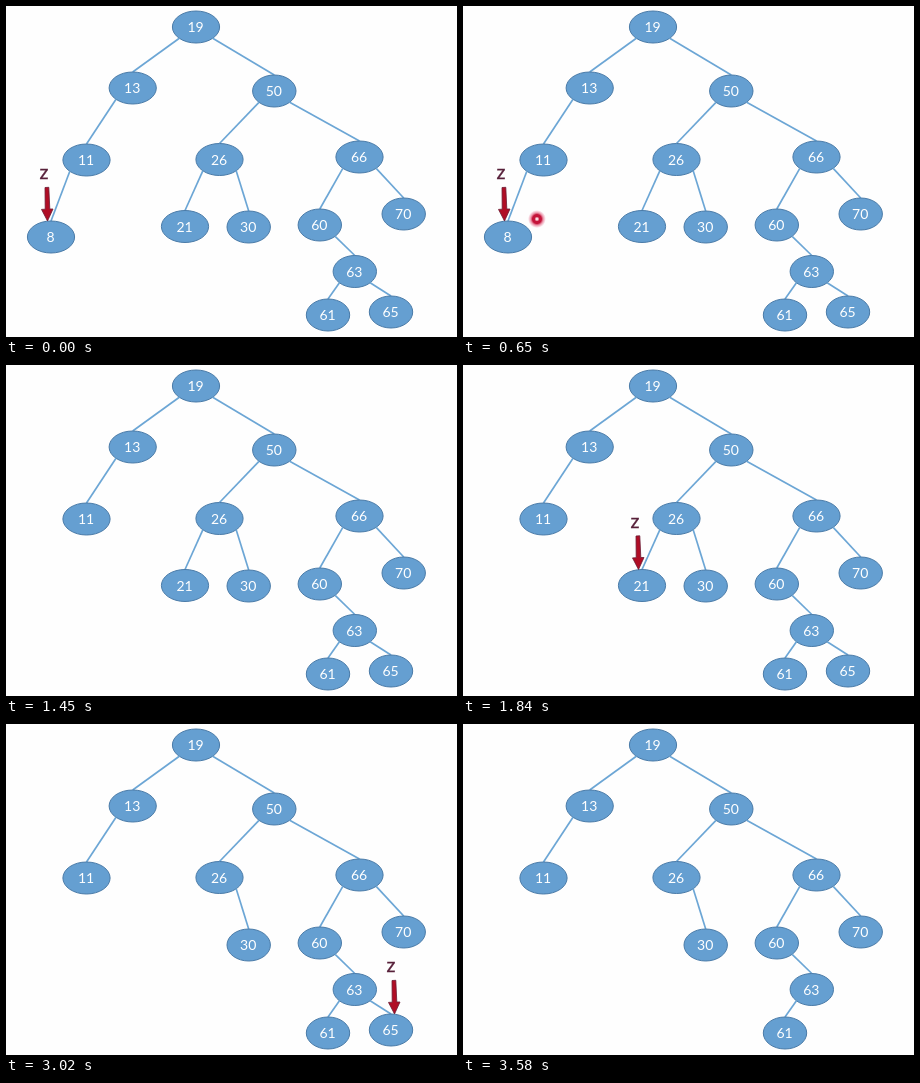
These frames come from a looping animation (451 px wide and 331 px high, 3.63 s). An HTML page:

```html
<!DOCTYPE html>
<html lang="en">
<head>
<meta charset="utf-8">
<title>Binary tree deletion</title>
<style>
  html, body { margin: 0; width: 100%; height: 100%; overflow: hidden; background: #fefefe; }
  svg { display: block; width: 451px; height: 331px; }
  text { font: 14px Lato, "Open Sans", sans-serif; text-anchor: middle; }
  .edge { stroke: #6ca6d5; stroke-width: 1.7; }
  .node ellipse { fill: #659fd1; stroke: #4a7ba8; }
  .node text { fill: #fff; }
  #pointer path { fill: #b00d25; stroke: #6b1c34; stroke-width: .8; }
  #pointer text { fill: #57203a; font-weight: 600; stroke: #57203a; stroke-width: .3; }
</style>
</head>
<body>
<svg viewBox="0 0 451 331">
  <defs>
    <radialGradient id="glow">
      <stop offset="0" stop-color="#fff"/>
      <stop offset=".12" stop-color="#f6c3cd"/>
      <stop offset=".28" stop-color="#c4143a"/>
      <stop offset=".5" stop-color="#c4143a"/>
      <stop offset=".7" stop-color="#d8355c" stop-opacity=".5"/>
      <stop offset="1" stop-color="#e0507a" stop-opacity="0"/>
    </radialGradient>
  </defs>
  <g id="tree"></g>
  <g id="pointer">
    <path d="M-2 -33.5 L1.8 -33.7 L2.8 -12 H6 L.5 0 L-5.5 -11.6 L-1.8 -11.8 Z"/>
    <text x="-3" y="-42">Z</text>
  </g>
  <circle id="dot" r="9" fill="url(#glow)"/>
</svg>
<script>
const LOOP = 3630;
const RY = 16, WIDE = 23.6, NARROW = 21.7;
const $ = id => document.getElementById(id);

const node = (label, x, y, rx, left, right) => ({ label, x, y, rx, left, right });

const eight = node(8, 45, 231, WIDE);
const twentyOne = node(21, 179, 220.5, WIDE);
const sixtyFive = node(65, 385, 306, NARROW);

const root =
  node(19, 190, 21, WIDE,
    node(13, 126.7, 82, WIDE,
      node(11, 80.5, 154, WIDE, eight)),
    node(50, 268.3, 85, NARROW,
      node(26, 213.5, 153.5, WIDE,
        twentyOne,
        node(30, 242.7, 221, NARROW)),
      node(66, 353.5, 151, WIDE,
        node(60, 313.8, 219, NARROW,
          null,
          node(63, 348.8, 265.5, NARROW,
            node(61, 322, 309, NARROW),
            sixtyFive)),
        node(70, 397.7, 208, NARROW))));

// Each leaf is pointed at from `from`, then deleted at `to`.
const visits = [
  { leaf: eight, from: 0, to: 1300, dx: -4 },
  { leaf: twentyOne, from: 1680, to: 2240, dx: -4 },
  { leaf: sixtyFive, from: 2810, to: 3370, dx: 3 }
];

function add(parent, tag, attrs, text = "") {
  const el = document.createElementNS("http://www.w3.org/2000/svg", tag);
  for (const key in attrs) el.setAttribute(key, attrs[key]);
  el.textContent = text;
  return parent.appendChild(el);
}

// Edges leave a parent at 45 degrees and meet the top of the child.
function build(n, parent, side) {
  const { x, y, rx } = n;
  n.el = add($("tree"), "g", { class: "node" });
  if (parent) {
    add(n.el, "line", {
      class: "edge",
      x1: parent.x + side * parent.rx * Math.SQRT1_2,
      y1: parent.y + RY * Math.SQRT1_2,
      x2: x, y2: y - RY
    });
  }
  add(n.el, "ellipse", { cx: x, cy: y, rx, ry: RY });
  add(n.el, "text", { x: x - 0.5, y: y + 5 }, n.label);
  if (n.left) build(n.left, n, -1);
  if (n.right) build(n.right, n, 1);
}

const show = (el, on) => el.setAttribute("visibility", on ? "visible" : "hidden");
const place = (el, x, y) => el.setAttribute("transform", `translate(${x} ${y})`);

function draw(t) {
  for (const { leaf, to } of visits) show(leaf.el, t < to);

  const visit = visits.find(({ from, to }) => t >= from && t < to);
  show($("pointer"), visit);
  if (visit) place($("pointer"), visit.leaf.x + visit.dx, visit.leaf.y - RY);

  // The laser dot glides onto the first leaf.
  const k = Math.min(1, (t - 650) / 430);
  show($("dot"), t > 450 && t < 1250);
  place($("dot"), 74 - 23 * k, 213 + 15 * k);
}

build(root);
const start = performance.now();
function tick() {
  draw((performance.now() - start) % LOOP);
  requestAnimationFrame(tick);
}
tick();
</script>
</body>
</html>
```
